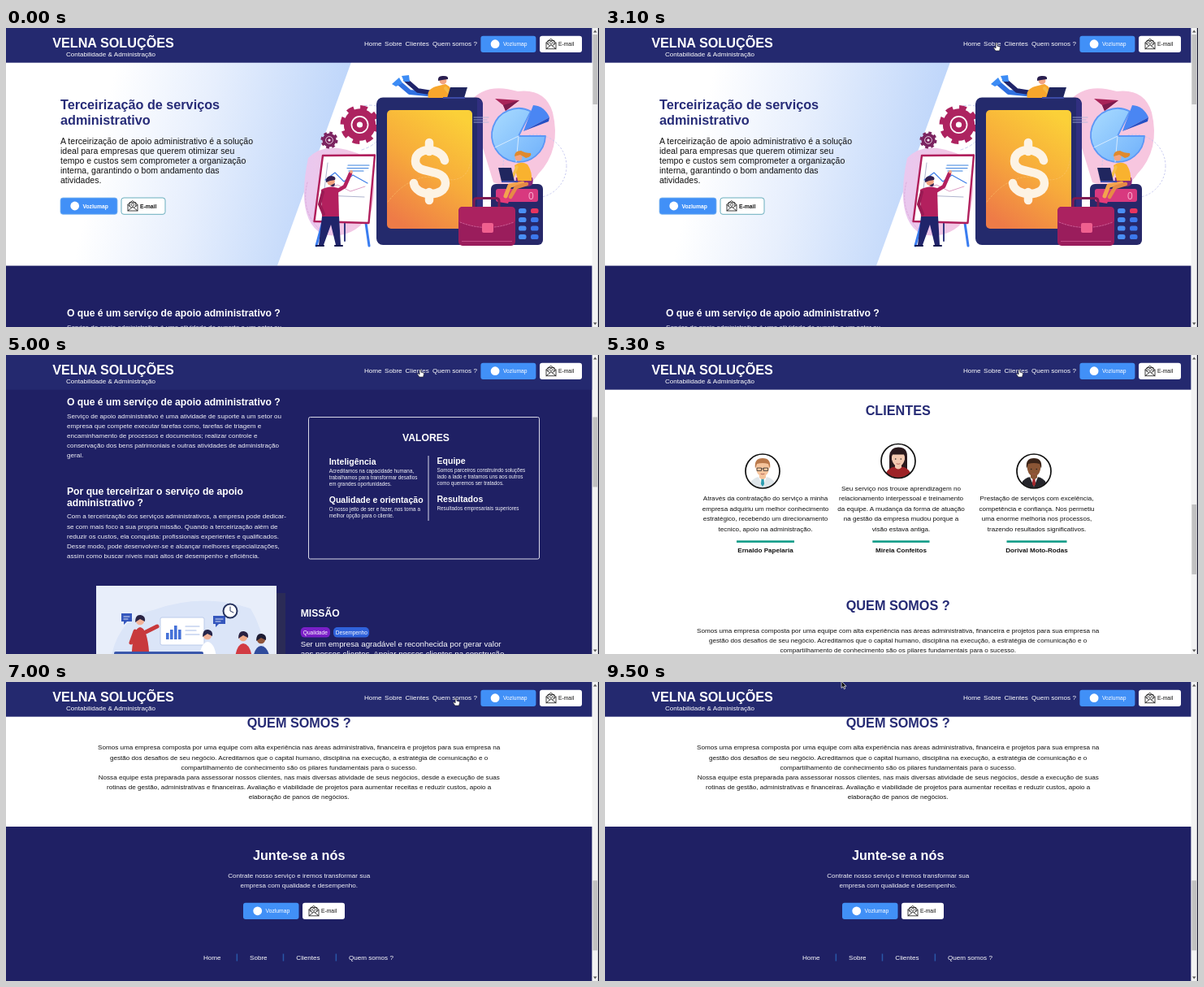
These frames come from a looping animation (730 by 368 pixels, 9800 ms). An HTML page:

```html
<!DOCTYPE html>
<html lang="pt-BR">
<head>
<meta charset="utf-8">
<title>Velna Soluções</title>
<style>
html, body { margin: 0; width: 100%; height: 100%; overflow: hidden; background: #fff; }
svg { display: block; width: 730px; height: 368px; font-family: "Liberation Sans", Arial, sans-serif; }
text { white-space: pre; }
</style>
</head>
<body>
<svg id="stage" viewBox="0 0 730 368" xmlns="http://www.w3.org/2000/svg"></svg>
<script>
const LOOP = 9800;
const WIDE = 721.6; // page width beside the scrollbar
const NAVY = '#24296f', DARK = '#1f2064', BLUE = '#4190f7', INK = '#111';
const SM = 6.76, BASE = 8.11, LEAD = 10.54, H3 = 12.17, H2 = 16.22;

// ---- drawing helpers (text y is the middle of the line) ----
const text = (x, y, s, size, fill, o = {}) =>
  `<text x="${x}" y="${y + size * 0.35}" font-size="${size}" fill="${fill}"` +
  `${o.bold ? ' font-weight="700"' : ''}${o.mid ? ' text-anchor="middle"' : ''}>${s}</text>`;
const lines = (x, y, step, list, size, fill, o) =>
  list.map((s, i) => text(x, y + i * step, s, size, fill, o)).join('');
const rect = (x, y, w, h, fill, r = 0, extra = '') =>
  `<rect x="${x}" y="${y}" width="${w}" height="${h}" rx="${r}" fill="${fill}" ${extra}/>`;
const circ = (x, y, r, fill, extra = '') => `<circle cx="${x}" cy="${y}" r="${r}" fill="${fill}" ${extra}/>`;
const path = (d, fill, extra = '') => `<path d="${d}" fill="${fill}" ${extra}/>`;
const line = (d, color, w, extra = '') =>
  path(d, 'none', `stroke="${color}" stroke-width="${w}" stroke-linecap="round" stroke-linejoin="round" ${extra}`);
const group = (x, y, body) => `<g transform="translate(${x} ${y})">${body}</g>`;

const envelope = (x, y) => group(x, y,
  line('M0 5V12.5H12V5L6 .3Z M0 5.2L4.4 8.6 M12 5.2L7.6 8.6 M0 12.5L6 7.6 12 12.5', INK, 0.8) +
  line('M2.2 6.6V2.2H9.8V6.6', INK, 0.8) + circ(6, 5, 1.7, 'none', 'stroke="#111" stroke-width=".7"'));

function buttons(x, y, w1, x2, w2, hero) {
  const o = { bold: hero };
  return rect(x, y, w1, 20.3, BLUE, 3, hero ? 'stroke="#7fb6ee" stroke-width=".8"' : '') +
    circ(x + 17.7, y + 10, 5.4, '#fff') +
    text(x + 27.5, y + 10.2, 'Vozlumap', SM, '#fff', o) +
    rect(x2, y, w2, 20.3, '#fff', 3, hero ? 'stroke="#69aebd" stroke-width="1"' : '') +
    envelope(x2 + 8, y + 3.5) + text(x2 + 23, y + 10.2, 'E-mail', SM, INK, o);
}

const gear = (x, y, r, color) =>
  circ(x, y, r * 0.88, 'none', `stroke="${color}" stroke-width="${r * 0.24}" stroke-dasharray="${r * 0.36} ${r * 0.331}"`) +
  circ(x, y, r * 0.82, color) + circ(x, y, r * 0.42, color, `stroke="#fff" stroke-width="${r * 0.07}"`) +
  circ(x, y, r * 0.15, '#fff');

function tablet() {
  return rect(456, 85.5, 131, 181.5, '#242a6c', 8) + path('M580 87Q587 88 587 95V260Q587 266 580 267Z', '#312f80') +
    rect(469, 101, 105, 146, 'url(#gold)', 5) +
    line('M470 214Q500 176 535 185T573 158', '#f8c36a', 0.6, 'stroke-dasharray="2 2"') +
    line('M540 163C537 147 504 145 504 164C504 182 541 171 541 191C541 209 504 208 502 191', '#fdf3e4', 10.5) +
    line('M521 141V152M521 202V212', '#fdf3e4', 10.5) +
    line('M576 110H594M576 113H592M576 116H594', '#a9b4d8', 0.8);
}

function lyingMan() {
  return line('M483 67L497 79L528 82', '#2f6fe0', 6) + line('M492 64L507 77L526 80', '#20246a', 5.5) +
    path('M475 69L484 61L488 68L480 72Z', '#3c8cf5') + path('M487 59L496 58L497 66L490 66Z', '#3c8cf5') +
    path('M520 86Q517 76 529 72L541 69Q550 73 550 86Z', '#f7a62c') +
    line('M541 74L549 84', '#f6b943', 4) + circ(538, 65, 4.4, '#f2a584') +
    path('M532 65Q531 58 539 59Q545 59 544 63L537 64Z', '#2a1f50') +
    path('M547 73H568L564 86H543Z', '#20265f') + rect(538, 85, 27, 2, '#3b4aa5');
}

function boardMan() {
  return line('M390 238L382 268M443 240L447 268', '#3a7df0', 3) + line('M417 240V262', '#343a80', 2) +
    path('M390 157L454 156.5L446.5 240L379.5 238Z', '#fff', 'stroke="#b01f5c" stroke-width="2.4" stroke-linejoin="round"') +
    line('M396 166L391 206L441 208', '#8c93b8', 0.7) +
    line('M393 187L405 178L416 189L427 181L445 191', '#3f7ee8', 1.2) +
    line('M421 169H447M420 172.5H446M422 176H440', '#3b82e0', 1.2) +
    line('M392 200L408 193L424 201L442 195', '#cf76ae', 0.7) +
    line('M407 201L417 195L424 179', '#b3205e', 4.5) + circ(425, 177, 2, '#f2a584') +
    path('M388 199Q398 193 409 197L410 234H389Z', '#b3205e') +
    line('M390 202L386 217L391 229', '#9a1a54', 4) +
    path('M389 232H410L412 267H406L400 242L391 267H385Z', '#20246a') +
    line('M382 268H391M405 268H414', '#161a50', 2.2) +
    circ(400, 189, 4.8, '#f0a07c') + path('M394 190Q393 182 401 182Q407 183 405 187L399 188Z', '#33204f') +
    path('M399 194Q405 197 405 191Z', '#33204f');
}

function calculator() {
  const keys = [222, 233, 243.5, 254].map((y, r) =>
    rect(631, y, 9.5, 6, '#4a8ff5', 2.6) + rect(646, y, 9.5, 6, r ? '#3c78ec' : '#e8345f', 2.6));
  return rect(597, 192, 64, 75, '#272869', 6) + rect(603, 198, 52, 16, '#d8397f', 3) +
    text(643, 207, '0', 12, '#f9a9cd') + keys.join('');
}

function sittingWoman() {
  return path('M628 184H648Q651 194 643 195L627 194Z', '#8a2a7c') +
    line('M636 191L620 194L615 207', '#f3a34e', 5) + line('M641 192L628 196L621 208', '#e68a45', 4.5) +
    path('M609 209L620 211L618 216L606 214Z', '#e63a78') +
    path('M626 169Q634 163 642 168Q648 177 647 188H630Z', '#f9b22f') +
    line('M629 171L624 183L616 184', '#f6c04a', 3.4) + circ(631, 159, 4.6, '#f2a584') +
    path('M626 158Q626 151 634 151Q639 154 646 154Q648 158 640 160L633 156Z', '#e08a2c') +
    path('M606 172H622L626 189H610Z', '#20265f') + rect(610, 188, 20, 2, '#3b4aa5');
}

function briefcase() {
  return line('M576 221V213Q576 209.5 580 209.5H603Q607 209.5 607 213V221', '#7c1a52', 3) +
    rect(557, 220, 70, 48, '#9a1d5c', 5) + path('M557 226Q557 220 562 220H622Q627 220 627 226V238Q592 252 557 238Z', '#ab2260') +
    line('M559 239Q592 252 625 239', '#dc6fa4', 0.8, 'stroke-dasharray="2 1.6"') +
    rect(586, 240, 14, 12, '#f0608f', 2) + rect(561, 262, 62, 1, '#c24a85');
}

const pie = () =>
  path('M631 133L646 102.5A33 33 0 1 0 664 133Z', 'url(#pie)', 'stroke="#5b97f6" stroke-width="1.8" stroke-linejoin="round"') +
  line('M631 133L602 147M631 133L628 165', '#e6f3ff', 0.8) +
  path('M637 127L649 95Q663 96 669 110Z', '#4a86f3') + path('M637 127L669 110L668 115Z', '#2450c4');

const illustration = () =>
  path('M372 160Q392 140 426 152Q462 160 450 225Q430 262 390 254Q356 236 372 160Z', 'url(#lilac)') +
  path('M570 92Q590 66 630 78Q664 74 673 104Q684 150 655 180Q640 205 600 190Z', '#f7c6df') +
  circ(651, 170, 39, 'none', 'stroke="#c3c6ef" stroke-width=".9" stroke-dasharray="2.4 2"') +
  line('M371 190Q362 226 388 250', '#d9a5d6', 0.8, 'stroke-dasharray="2 2"') +
  line('M438 150Q470 140 466 105Q460 92 440 96', '#c8cdf0', 1, 'stroke-dasharray="3 3"') +
  gear(435.5, 119, 24, '#ad2360') + gear(398, 138, 10.5, '#7c2360') +
  tablet() + lyingMan() + boardMan() +
  path('M602 87L632 89L615 102L612 95Z', '#a82358') + path('M612 95L632 89L615 102Z', '#7c1b4c') +
  pie() + calculator() + sittingWoman() + briefcase();

const hero = () =>
  rect(0, 0, WIDE, 292.6, '#fff') + path('M0 42H425L334 292.6H0Z', 'url(#sky)') + illustration() +
  lines(67, 94.5, 18.7, ['Terceirização de serviços', 'administrativo'], H2, '#272c78', { bold: true }) +
  lines(67, 139.3, 12.1, ['A terceirização de apoio administrativo é a solução', 'ideal para empresas que querem otimizar seu',
    'tempo e custos sem comprometer a organização', 'interna, garantindo o bom andamento das', 'atividades.'], LEAD, INK) +
  buttons(67, 209, 70, 142, 54, true);

const sitter = (x, y, hair, shirt, skin) =>
  path(`M${x - 11} 100Q${x - 10} ${y + 9} ${x} ${y + 8}Q${x + 11} ${y + 9} ${x + 12} 100Z`, shirt) +
  circ(x, y, 5.2, skin) + path(`M${x - 6} ${y + 2}Q${x - 6} ${y - 8} ${x + 1} ${y - 7}Q${x + 7} ${y - 6} ${x + 6} ${y + 1}L${x} ${y - 2}Z`, hair);

const meeting = () =>
  rect(222, 9, 11, 140, '#2b2b56') + rect(0, 0, 222, 148, '#e8eefa') +
  path('M14 148Q10 40 70 30Q130 8 190 28Q216 70 210 148Z', '#dbe5f8') +
  rect(79, 39, 54, 34, '#fff', 2, 'stroke="#bccbea"') +
  [8, 12, 17, 12].map((h, i) => rect(86 + i * 5, 66 - h, 3.6, h, '#4672d8')).join('') +
  line('M110 50H127M110 55H123M110 60H127', '#a5bbe8', 1.2) +
  path('M31 34H44V44H38L34 48V44H31Z', '#3557bd') + line('M34 38H41M34 41H39', '#fff', 0.8) +
  path('M144 37H159V47H151L147 51V47H144Z', '#3557bd') + line('M147 41H156M147 44H153', '#fff', 0.8) +
  circ(165, 31, 8.5, '#fff', 'stroke="#27345f" stroke-width="2"') + line('M165 26V31L169 33', '#27345f', 1) +
  line('M61 57L75 50M48 56L43 70', '#c8393c', 5) + sitter(54, 43, '#2b2444', '#c8393c', '#f2b297') +
  sitter(137, 61, '#27264a', '#fff', '#f2b297') + sitter(181, 63, '#2a2140', '#d23b42', '#efa988') +
  sitter(203, 66, '#1d1c33', '#2f4b9c', '#8f563c') + rect(22, 81, 110, 4, '#3a57ab', 2);

const about = () =>
  rect(0, -0.4, WIDE, 460.4, DARK) +
  text(75, 57.5, 'O que é um serviço de apoio administrativo ?', H3, '#fff', { bold: true }) +
  lines(75, 75, 12.15, ['Serviço de apoio administrativo é uma atividade de suporte a um setor ou',
    'empresa que compete executar tarefas como, tarefas de triagem e',
    'encaminhamento de processos e documentos; realizar controle e',
    'conservação dos bens patrimoniais e outras atividades de administração', 'geral.'], BASE, '#f4f4fa') +
  lines(75, 167.3, 14.2, ['Por que terceirizar o serviço de apoio', 'administrativo ?'], H3, '#fff', { bold: true }) +
  lines(75, 198.6, 12.15, ['Com a terceirização dos serviços administrativos, a empresa pode dedicar-',
    'se com mais foco a sua propria missão. Quando a terceirização além de',
    'reduzir os custos, ela conquista: profissionais experientes e qualificados.',
    'Desse modo, pode desenvolver-se e alcançar melhores especializações,',
    'assim como buscar níveis mais altos de desempenho e eficiência.'], BASE, '#f4f4fa') +
  rect(372.5, 76.5, 284, 174.5, 'none', 2, 'stroke="#d9d9e8"') +
  text(517, 102, 'VALORES', H3, '#fff', { bold: true, mid: true }) + rect(519.5, 124, 1, 80, '#d9d9e8') +
  [[397.7, 131.5, 'Inteligência', ['Acreditamos na capacidade humana,', 'trabalhamos para transformar desafios', 'em grandes oportunidades.']],
    [397.7, 178.8, 'Qualidade e orientação', ['O nosso jeito de ser e fazer, nos torna a', 'melhor opção para o cliente.']],
    [530.5, 130.5, 'Equipe', ['Somos parceiros construindo soluções', 'lado a lado e tratamos uns aos outros', 'como queremos ser tratados.']],
    [530.5, 177.8, 'Resultados', ['Resultados empresariais superiores']]
  ].map(([x, y, h, l]) => text(x, y, h, LEAD, '#fff', { bold: true }) + lines(x, y + 11.4, 7.7, l, 6.33, '#f4f4fa')).join('') +
  group(111, 284, meeting()) +
  text(362.7, 317.5, 'MISSÃO', H3, '#fff', { bold: true }) +
  rect(362.7, 335, 36.3, 12.6, '#7a1fc8', 5) + text(365.8, 341.2, 'Qualidade', 6.59, '#fff') +
  rect(403, 335, 44, 12.6, '#2f62dc', 5) + text(405.8, 341.2, 'Desempenho', 6.59, '#fff') +
  lines(362.7, 355.5, 12.2, ['Ser um empresa agradável e reconhecida por gerar valor',
    'aos nossos clientes. Apoiar nossos clientes na construção'], 9.73, '#fff');

function avatar(x, y, skin, hair, coat, kind) {
  const long = kind === 'long';
  return group(x, y, circ(0, 0, 21, '#fff') +
    (long ? path('M-11 12V-6Q-10 -17 0 -17Q11 -17 11 -6V12Z', hair) : '') +
    path('M-15 14.5Q-12 8 -4 7H4Q12 8 15 14.5Q8 20.5 0 20.5T-15 14.5Z', coat) +
    (long ? '' : path('M-5 7L0 19L5 7Z', '#fff') + path('M-1.5 9H1.5L2 16L0 19L-2 16Z', kind === 'tie' ? '#a3262c' : '#2c9db0')) +
    path('M-4 3H4V8Q0 12 -4 8Z', skin) + path('M-8 -8Q-8 -14 0 -14T8 -8V-2Q6 6 0 7Q-6 6 -8 -2Z', skin) +
    (long ? path('M-9 -3V-10Q-6 -16 0 -16T9 -10V-3L7 -8H-7Z', hair)
      : path('M-9 -3Q-11 -16 0 -16Q11 -16 9 -3L7 -9Q0 -11 -7 -9Z', hair)) +
    (kind === 'glasses' ? line('M-6.5 -4H-1.5V-.5H-6.5ZM1.5 -4H6.5V-.5H1.5ZM-1.5 -3H1.5', '#333', 0.8)
      : circ(-3.3, -2.5, 0.8, '#222') + circ(3.3, -2.5, 0.8, '#222')) +
    line('M-2 3.4Q0 4.4 2 3.4', '#a8514a', 0.8) +
    circ(0, 0, 21, 'none', 'stroke="#111" stroke-width="1.7"'));
}

const clients = () =>
  rect(0, 0, WIDE, 437, '#fff') +
  text(360.7, 68.7, 'CLIENTES', H2, '#252a74', { bold: true, mid: true }) +
  avatar(194, 143, '#f5c49c', '#b9784a', '#dfe6ea', 'glasses') +
  avatar(361, 130.5, '#f3c8b0', '#2b1a1e', '#9d2226', 'long') +
  avatar(528, 143, '#8a5535', '#3a2318', '#26262c', 'tie') +
  [[197.5, 176.3, ['Através da contratação do serviço a minha', 'empresa adquiriu um melhor conhecimento',
    'estratégico, recebendo um direcionamento', 'tecnico, apoio na administração.'], 162, 71, 'Ernaldo Papelaria'],
  [364.5, 163.7, ['Seu serviço nos trouxe aprendizagem no', 'relacionamento interpessoal e treinamento',
    'da equipe. A mudança da forma de atuação', 'na gestão da empresa mudou porque a', 'visão estava antiga.'], 329.3, 70.2, 'Mirela Confeitos'],
  [531.5, 176.3, ['Prestação de serviços com excelência,', 'competência e confiança. Nos permetiu',
    'uma enorme melhoria nos processos,', 'trazendo resultados significativos.'], 494.5, 74, 'Dorival Moto-Rodas']
  ].map(([x, y, l, bx, bw, name]) => lines(x, y, 12.65, l, BASE, INK, { mid: true }) +
    rect(bx, 228.3, bw, 2.6, '#119c88') + text(x, 240, name, BASE, INK, { bold: true, mid: true })).join('');

const closing = () =>
  text(360.7, 50, 'QUEM SOMOS ?', H2, '#252a74', { bold: true, mid: true }) +
  lines(360.7, 80.5, 12.2, [
    'Somos uma empresa composta por uma equipe com alta experiência nas áreas administrativa, financeira e projetos para sua empresa na',
    'gestão dos desafios de seu negócio. Acreditamos que o capital humano, disciplina na execução, a estratégia de comunicação e o',
    'compartilhamento de conhecimento são os pilares fundamentais para o sucesso.',
    'Nossa equipe esta preparada para assessorar nossos clientes, nas mais diversas atividade de seus negócios, desde a execução de suas',
    'rotinas de gestão, administrativas e financeiras. Avaliação e viabilidade de projetos para aumentar receitas e reduzir custos, apoio a',
    'elaboração de panos de negócios.'], BASE, INK, { mid: true }) +
  rect(0, 178, WIDE, 330, DARK) +
  text(360.7, 213.3, 'Junte-se a nós', H2, '#fff', { bold: true, mid: true }) +
  lines(360.7, 238, 12.2, ['Contrate nosso serviço e iremos transformar sua', 'empresa com qualidade e desempenho.'], BASE, '#f4f4fa', { mid: true }) +
  buttons(292, 271.8, 68.5, 365, 52) +
  [[243, 'Home'], [300, 'Sobre'], [357.3, 'Clientes'], [422, 'Quem somos ?']].map(([x, s]) => text(x, 339.3, s, BASE, '#fff')).join('') +
  [283.6, 340.7, 405.6].map(x => rect(x, 334.5, 1.5, 9, '#2a57a8')).join('');

const NAV = [[441, 'Home', 462], [466, 'Sobre', 488], [491.5, 'Clientes', 521], [525, 'Quem somos ?', 580]];
const header = () =>
  rect(0, 0, WIDE, 42.7, NAVY) +
  text(132, 18.8, 'VELNA SOLUÇÕES', H2, '#fff', { bold: true, mid: true }) +
  text(129, 31.8, 'Contabilidade &amp; Administração', BASE, '#fff', { mid: true }) +
  NAV.map(([x, s]) => text(x, 19.5, s, BASE, '#fff')).join('') +
  buttons(584.4, 9.7, 68, 657, 52);

const scrollbar = () =>
  rect(WIDE, 0, 7.2, 368, '#f3f3f3') + rect(728.8, 0, 1.2, 368, '#15152c') +
  path('M723 5.5L725.2 2.5L727.4 5.5Z', '#555') + path('M723 362.5L725.2 365.5L727.4 362.5Z', '#555') +
  rect(722.4, 0, 5.8, 86, '#c1c1c1', 0, 'id="thumb"');

const cursors = () =>
  '<g id="arrow">' + path('M0 0V8.4L2 6.7L3.4 9.7L4.8 9L3.4 6.2H6Z', '#111', 'stroke="#fff" stroke-width=".7"') + '</g>' +
  '<g id="hand">' + path('M-.9 .4Q0 -.6 .9 .4V3.2L3.8 4Q4.6 4.4 4.4 5.6L3.6 9H-1.2L-3.4 5.7Q-3.4 4.4 -2 5L-.9 6Z', '#fff', 'stroke="#222" stroke-width=".6"') + '</g>';

const gradient = (id, dir, stops) => `<linearGradient id="${id}" ${dir}>` +
  stops.map(([o, c]) => `<stop offset="${o}" stop-color="${c}"/>`).join('') + '</linearGradient>';

const $ = id => document.getElementById(id);
$('stage').innerHTML = '<defs>' +
  gradient('sky', 'gradientUnits="userSpaceOnUse" x1="115" y1="140" x2="400" y2="200"', [[0, '#fff'], [0.42, '#e7effd'], [1, '#bdd5fa']]) +
  gradient('gold', 'x1=".75" y1="0" x2=".25" y2="1"', [[0, '#fbd038'], [0.5, '#f7ab3b'], [1, '#ee7b47']]) +
  gradient('lilac', 'x1="0" y1="0" x2="1" y2="0"', [[0, '#e9c8ef'], [1, '#f6c6e0']]) +
  gradient('pie', 'x1="0" y1="0" x2="1" y2="1"', [[0, '#aadcff'], [1, '#6fb0fb']]) + '</defs>' +
  '<g id="page">' + hero() + group(0, 293, about()) + group(0, 753, clients()) + group(0, 1011.5, closing()) + '</g>' +
  header() + scrollbar() + cursors();

// ---- motion ----
const SCROLL = [[0, 0], [3300, 293], [5300, 753], [7000, 1011.5]];
const POINTER = [
  [1000, 452, 4], [1400, 495, 32], [1900, 490, 30], [2900, 482, 19],
  [3800, 482, 19], [4200, 498, 19], [4500, 498, 19], [5000, 510, 18],
  [5900, 510, 18], [6500, 554, 20], [7400, 554, 20], [8300, 440, 262],
  [8600, 440, 262], [9500, 291, -1]
];
const ease = k => k * k * (3 - 2 * k);

function pointerAt(t) {
  const i = POINTER.findIndex(p => p[0] > t);
  if (i < 0) return POINTER[POINTER.length - 1].slice(1);
  const [t0, x0, y0] = POINTER[i - 1], [t1, x1, y1] = POINTER[i];
  const k = ease((t - t0) / (t1 - t0));
  return [x0 + (x1 - x0) * k, y0 + (y1 - y0) * k];
}

function draw(now) {
  const t = Math.floor((now % LOOP) / 100) * 100;
  const y = SCROLL.filter(s => s[0] <= t).pop()[1];
  $('page').setAttribute('transform', `translate(0 ${-y})`);
  $('thumb').setAttribute('y', 8 + y / 4.28);
  const shown = t >= POINTER[0][0];
  const [px, py] = shown ? pointerAt(t) : [0, 0];
  const link = py > 14 && py < 25 && NAV.some(([a, , b]) => px >= a && px <= b);
  for (const [id, on] of [['arrow', shown && !link], ['hand', shown && link]]) {
    $(id).setAttribute('visibility', on ? 'visible' : 'hidden');
    $(id).setAttribute('transform', `translate(${px} ${py})`);
  }
}

function tick() {
  draw(performance.now());
  requestAnimationFrame(tick);
}
tick();
</script>
</body>
</html>
```
